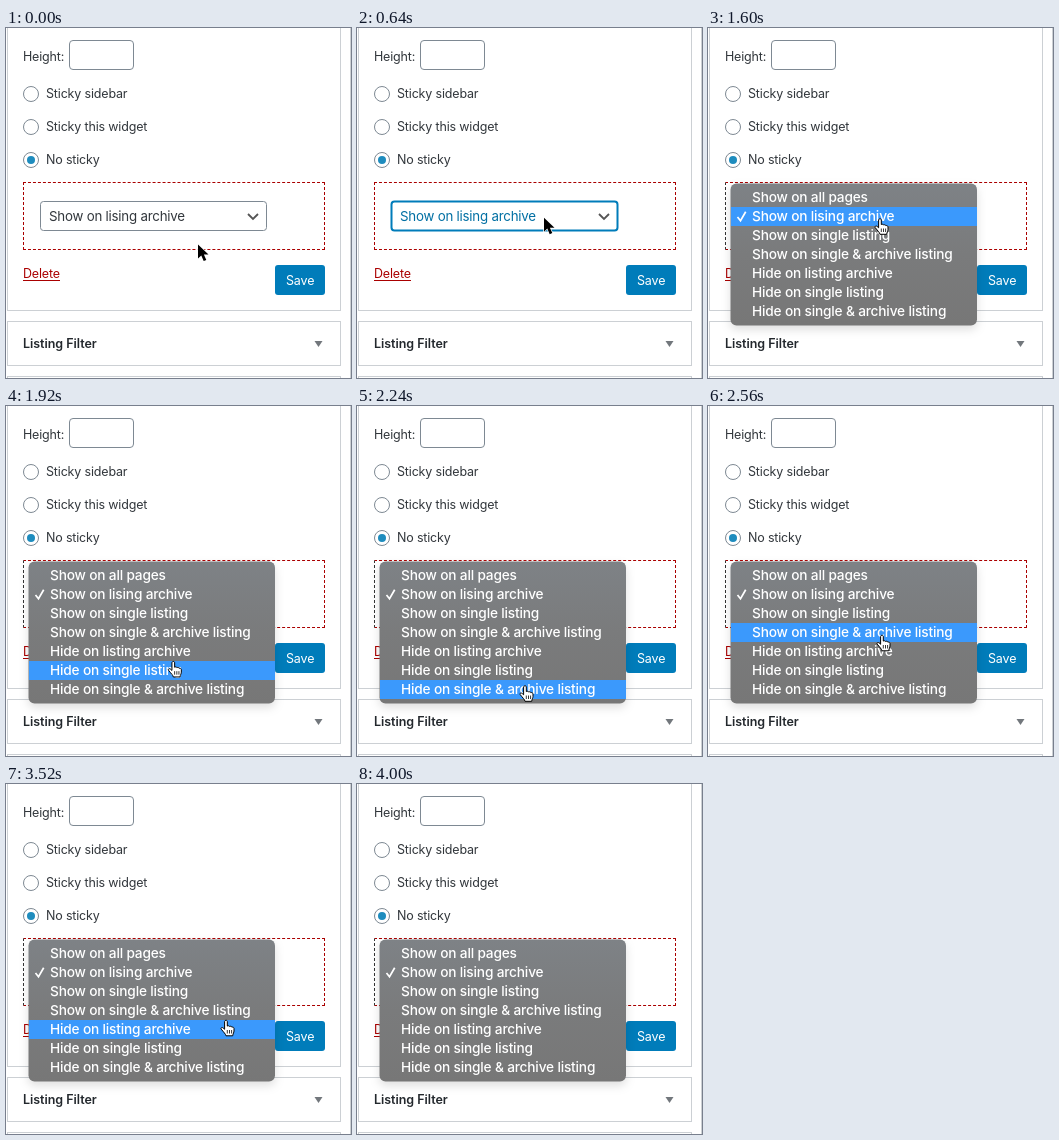
An HTML page that plays this animation: 345x350 px, repeating every 4320 ms.

```html
<!DOCTYPE html>
<html lang="en">
<head>
<meta charset="utf-8">
<title>Widget settings</title>
<style>
  html, body { margin: 0; width: 100%; height: 100%; overflow: hidden; background: #fff; }
  svg { display: block; }
  text { font: 12.5px Inter, Roboto, sans-serif; letter-spacing: -.17px; fill: #32373c; }
  .title { font-weight: 600; letter-spacing: -.03px; fill: #23282d; }
  .delete { fill: #a00; }
  .save { fill: #fff; }
  .panel { fill: #fff; stroke: #ccd0d4; }
  .field { fill: #fff; stroke: #7e8993; }
  #dashed { box-sizing: border-box; height: 68px; border: 1px dashed #a00; }
  #dashed.shaded { border-left-color: #333; }
  #select text { font-size: 13.3px; letter-spacing: -.22px; }
  #select.focus rect { stroke: #007cba; stroke-width: 2; }
  #select.focus text { fill: #016fa3; }
  #menu text { font-size: 13.7px; font-weight: 500; letter-spacing: -.18px; fill: #fff; }
  #box { filter: drop-shadow(0 4px 5px rgba(0, 0, 0, .13)); }
</style>
</head>
<body>
<svg width="345" height="350" viewBox="0 0 345 350">
  <defs>
    <linearGradient id="grey" x2="0" y2="1">
      <stop offset="0" stop-color="#7e8286"/>
      <stop offset=".5" stop-color="#7a7b7c"/>
      <stop offset="1" stop-color="#777"/>
    </linearGradient>
  </defs>

  <path d="M344.5 0V350" stroke="#ccd0d4"/>
  <rect class="panel" x="1.5" y="-5.5" width="333" height="288"/>
  <rect class="panel" x="1.5" y="293.5" width="333" height="44"/>
  <rect class="panel" x="1.5" y="348.5" width="333" height="44"/>

  <text x="17" y="33">Height:</text>
  <rect class="field" x="63.5" y="12.5" width="64" height="29" rx="3.5"/>
  <g id="radios"></g>

  <foreignObject x="17" y="154" width="302" height="68"><div id="dashed"></div></foreignObject>
  <g id="select">
    <rect class="field" x="34.5" y="173.5" width="226" height="29" rx="3"/>
    <text x="43" y="193">Show on lising archive</text>
    <path d="M242 186l5 5 5-5" fill="none" stroke="#555" stroke-width="1.8"/>
  </g>

  <text class="delete" x="17" y="250">Delete</text>
  <path d="M17 252.5H54" stroke="#a00"/>
  <rect x="269" y="237" width="50" height="30" rx="3" fill="#007cba"/>
  <text class="save" x="280" y="257">Save</text>

  <text class="title" x="17" y="320">Listing Filter</text>
  <path d="M308.5 313h8l-4 6z" fill="#72777c"/>

  <g id="menu">
    <rect id="box" x="22.5" y="155.5" width="246.5" height="142" rx="6" fill="url(#grey)"/>
    <rect id="bar" x="23" width="246" height="19" fill="#3b99fc"/>
    <path d="M29.5 189l3 3.8 5.2-9" fill="none" stroke="#fff" stroke-width="1.7"/>
    <g id="items"></g>
  </g>

  <g id="ring" fill="none">
    <circle cx="189.5" cy="196.5" r="15.7" stroke="#fff" stroke-width="3.6"/>
    <circle cx="189.5" cy="196.5" r="15.7" stroke="#222" stroke-width="1.5"/>
  </g>
  <path id="arrow" d="M0 0V14l3.3-3.1 2.4 5.6 2.6-1.1-2.4-5.3h4.6z" stroke="#fff" stroke-width="1.4" paint-order="stroke"/>
  <g id="hand" stroke="#000" stroke-linejoin="round">
    <path d="M5 1.2C6 .3 7.3 .9 7.3 2V6.6C8 6 9.4 6.2 9.6 7 10.4 6.5 11.7 6.8 11.9 7.7 12.8 7.3 14 7.8 14 9V11.5C14 13 13 14 12.7 16.3H6C5.7 14.5 3.6 12.7 1.2 9.6 .4 8.5 2 7.4 3.2 8.5L4.6 9.8V2Q4.6 1.5 5 1.2z" fill="#fff"/>
    <path d="M7.3 10.5v3.5M9.5 10.5v3.5M11.6 10.5v3.5" stroke-width=".8"/>
  </g>
</svg>

<script>
const $ = id => document.getElementById(id);
const STEP = 160, LOOP = 4320, CLICK = 3, OPEN = 6, LEAVE = 25;
const ROW = 19, MENU_TOP = 160;

$('radios').innerHTML = ['Sticky sidebar', 'Sticky this widget', 'No sticky'].map((label, i) => {
  const y = 66 + i * 33;
  const dot = i === 2 ? `<circle cx="25" cy="${y}" r="4" fill="#1e8cbe"/>` : '';
  return `<circle class="field" cx="25" cy="${y}" r="7.5"/>${dot}<text x="40" y="${y + 4}">${label}</text>`;
}).join('');

const options = [
  'Show on all pages', 'Show on lising archive', 'Show on single listing',
  'Show on single &amp; archive listing', 'Hide on listing archive',
  'Hide on single listing', 'Hide on single &amp; archive listing'
];
$('items').innerHTML = options.map((label, i) =>
  `<text x="44" y="${MENU_TOP + 14 + i * ROW}">${label}</text>`).join('');

// Turning points of the pointer: step, x, y
const path = [
  [0, 192, 216.5], [2, 187, 190], [5, 187, 189.5], [6, 181.5, 188], [10, 166, 190],
  [13, 159, 287], [14, 162, 279], [16, 168, 228.5], [17, 172, 188], [19, 176, 143],
  [21, 178, 142], [23, 250, 329], [24, 269, 349]
];

function pointer(n) {
  const i = Math.max(1, path.findIndex(p => p[0] >= n));
  const [a, ax, ay] = path[i - 1], [b, bx, by] = path[i];
  const k = (n - a) / (b - a);
  return [ax + (bx - ax) * k, ay + (by - ay) * k];
}

const show = (id, on) => { $(id).style.display = on ? '' : 'none'; };

function draw(n) {
  const open = n >= OPEN, present = n < LEAVE;
  const [x, y] = pointer(Math.min(n, LEAVE - 1));
  const row = Math.floor((y + 2 - MENU_TOP) / ROW);
  $('select').classList.toggle('focus', n >= CLICK);
  $('dashed').classList.toggle('shaded', open);
  show('menu', open);
  show('bar', row >= 0 && row < options.length);
  $('bar').setAttribute('y', MENU_TOP + row * ROW);
  show('ring', n === CLICK || n === OPEN);
  show('arrow', present && !open);
  show('hand', present && open);
  $(open ? 'hand' : 'arrow').setAttribute('transform', `translate(${x} ${y})`);
}

const start = performance.now();
let last = -1;
function tick() {
  const n = Math.floor((performance.now() - start) % LOOP / STEP);
  if (n !== last) draw(last = n);
  requestAnimationFrame(tick);
}
tick();
</script>
</body>
</html>
```
